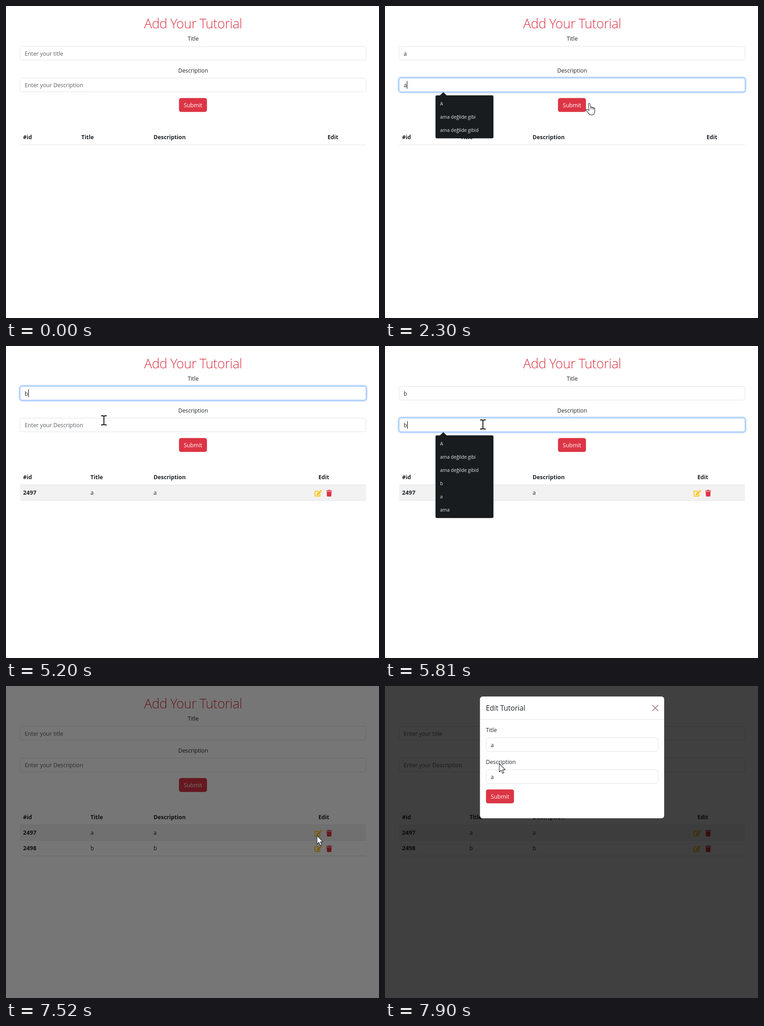
An HTML page with a canvas for the animation above (8 s loop, 819 px wide and 684 px high).

```html
<!DOCTYPE html>
<html lang="en">
<head>
<meta charset="utf-8">
<title>Tutorial form</title>
<style>
html, body { margin: 0; width: 100%; height: 100%; overflow: hidden; background: #fff; }
canvas { display: block; width: 819px; height: 684px; }
</style>
</head>
<body>
<canvas id="stage" width="819" height="684"></canvas>
<script>
const ctx = document.getElementById('stage').getContext('2d');
const LOOP = 8000, STEP = 100;
const RED = '#dc3545', DARK_RED = '#bb2d3b', INK = '#212529', HINT = '#5d6063', LINE = '#dee2e6';
const FACE = '"Open Sans", "Noto Sans", sans-serif';

const PENCIL = new Path2D('M402 82L494 174 494 186 274 406 182 416Q158 417 160 394L170 302 389 83ZM565 60L516 12Q488-10 461 12L425 47 425 61 515 151 529 151 565 116Q585 88 565 60ZM384 346V448H64V128H294L302 124 342 84Q349 70 334 64H48Q0 64 0 112V464Q0 512 48 512H400Q448 512 448 464V306Q442 288 427 298L387 338Z');
const BIN = new Path2D('M432 32H312L303 13Q296 0 281 0H167Q152 0 145 13L136 32H16Q0 32 0 48V80Q0 96 16 96H432Q448 96 448 80V48Q448 32 432 32ZM53 467Q58 512 101 512H347Q390 512 395 467L416 128H32Z');
const HAND = new Path2D('M-2.5 1.8Q-1-1 1 1.5L2.5 9Q4.5 7 6 9.5Q8 8 9 10.5Q11.5 9.5 11.5 13V19Q11 26 5 26Q0 26-2 22L-7.5 16Q-8 13-4.5 14L-.8 16Z');
const ARROW = new Path2D('M0 0V18.5L4.2 14.6 7 21.5 10 20.3 7.2 13.6H13Z');
const BEAM = new Path2D('M-6-10H-2L0-9 2-10H6M-6 10H-2L0 9 2 10H6M0-9V9');

const SUGGESTIONS = ['A', 'ama değilde gibi', 'ama değilde gibid', 'b', 'a', 'ama'];

// time, x, y, shape drawn from that time on
const PATH = [
  [100, 742, 662, 'arrow'], [400, 400, 330, 'arrow'], [600, 200, 118, 'beam'], [680, 185, 111, 'beam'],
  [1300, 185, 111, 'beam'], [1400, 186, 122, 'arrow'], [1500, 187, 147, 'arrow'], [1590, 188, 159, 'beam'],
  [1700, 189, 170, 'beam'], [2000, 189, 170, 'beam'], [2100, 270, 192, 'arrow'], [2300, 449, 213, 'hand'],
  [2400, 436, 217, 'hand'], [2900, 437, 220, 'hand'], [3100, 450, 242, 'arrow'], [3300, 473, 269, 'arrow'],
  [3400, 330, 178, 'beam'], [3500, 213, 113, 'beam'], [3700, 214, 109, 'beam'], [4000, 215, 112, 'beam'],
  [5000, 215, 112, 'beam'], [5100, 215, 135, 'arrow'], [5200, 215, 163, 'beam'], [5300, 215, 172, 'beam'],
  [5800, 215, 172, 'beam'], [5900, 340, 205, 'arrow'], [6000, 433, 219, 'hand'], [6400, 433, 219, 'hand'],
  [6600, 437, 229, 'hand'], [6700, 460, 244, 'arrow'], [7000, 630, 300, 'arrow'], [7200, 685, 324, 'hand'],
  [7400, 684, 327, 'arrow'], [7500, 683, 328, 'arrow'], [7600, 640, 312, 'arrow'], [7800, 330, 200, 'arrow'],
  [7900, 251, 170, 'arrow']
];

const clamp = v => Math.max(0, Math.min(1, v));
const within = (t, a, b) => t >= a && t < b;
const fade = (t, a, b) => t < b ? clamp((t - a) / 150 + 0.4) * (t >= a) : 0;
const blink = (t, since) => (t - since) % 1000 < 500;

function text(str, x, y, { size = 12.25, weight = 400, color = INK, align = 'left', gap = 0 } = {}) {
  ctx.font = `${weight} ${size}px ${FACE}`;
  ctx.letterSpacing = gap + 'px';
  ctx.textAlign = align;
  ctx.fillStyle = color;
  ctx.fillText(str, x, y);
}

function box(x, y, w, h, r, fill, stroke) {
  ctx.beginPath();
  ctx.roundRect(x, y, w, h, r);
  if (fill) { ctx.fillStyle = fill; ctx.fill(); }
  if (stroke) { ctx.strokeStyle = stroke; ctx.lineWidth = 1; ctx.stroke(); }
}

function rule(x, y, w) {
  ctx.fillStyle = LINE;
  ctx.fillRect(x, y, w, 1);
}

function field(x, y, w, value, hint, focus = 0, caret = false) {
  if (focus) {
    ctx.globalAlpha = focus;
    box(x - 3.2, y - 3.2, w + 6.4, 36.4, 8, '#c2dbfe');
    ctx.globalAlpha = 1;
  }
  box(x, y, w, 30, 4.5, '#fff', focus ? '#86b7fe' : LINE);
  text(value || hint, x + 10, y + 20, { color: value ? INK : HINT });
  if (caret) {
    ctx.fillStyle = '#000';
    ctx.fillRect(Math.round(x + 10 + (value ? ctx.measureText(value).width : -0.4)), y + 6.5, 1, 17);
  }
}

function button(x, y, fill) {
  box(x, y, 61.5, 30.5, 4.8, fill);
  text('Submit', x + 30.75, y + 19.8, { color: '#fff', align: 'center' });
}

function icon(shape, x, y, color) {
  ctx.save();
  ctx.translate(x, y);
  ctx.scale(0.0281, 0.0281);
  ctx.fillStyle = color;
  ctx.fill(shape, 'evenodd');
  ctx.restore();
}

function table(rows) {
  const bold = { weight: 700 };
  const titleX = rows.length ? 185.5 : 165.5;
  text('#id', 37.5, 292.3, bold);
  text('Title', titleX, 292.3, bold);
  text('Description', 324, 292.3, bold);
  text('Edit', rows.length ? 686 : 706, 292.3, bold);
  rows.forEach((name, i) => {
    const y = 304 + i * 34;
    if (i % 2 === 0) {
      ctx.fillStyle = '#f2f2f2';
      ctx.fillRect(31, y, 759.5, 34);
    }
    rule(31, y + 34, 759.5);
    text(String(2497 + i), 37.5, y + 22, { weight: 700, size: 12.8 });
    text(name, titleX, y + 22);
    text(name, 324, y + 22);
    icon(PENCIL, 677.6, y + 11.6, '#ffc107');
    icon(BIN, 703.2, y + 11.6, RED);
  });
  rule(31, 304, 759.5);
}

function popup(count) {
  ctx.save();
  ctx.shadowColor = 'rgba(0,0,0,.3)';
  ctx.shadowBlur = 3;
  box(111, 196, 127, 7 + 29 * count, 3, '#181c1f');
  ctx.restore();
  ctx.beginPath();
  ctx.moveTo(120, 196.5);
  ctx.lineTo(128, 189);
  ctx.lineTo(136, 196.5);
  ctx.fillStyle = '#181c1f';
  ctx.fill();
  SUGGESTIONS.slice(0, count).forEach((s, i) =>
    text(s, 121, 218 + 29 * i, { size: 10.25, color: '#e4e6e8' }));
}

function dialog(t) {
  const p = clamp((t - 7560) / 300);
  if (!p) return;
  const e = 1 - (1 - p) ** 2;
  ctx.save();
  ctx.globalAlpha = e;
  ctx.translate(0, -40 * (1 - e));
  box(208.5, 23, 404.5, 267, 6, '#fff');
  rule(209, 73, 404);
  text('Edit Tutorial', 221.5, 54, { size: 15.5, weight: 500 });
  ctx.strokeStyle = '#936f66';
  ctx.lineWidth = 1.5;
  ctx.stroke(new Path2D('M587 42L600 54.5M600 42L587 54.5'));
  text('Title', 221.5, 101.3);
  field(222, 113.5, 377.5, 'a');
  text('Description', 221.5, 171.3);
  field(222, 183.5, 377.5, 'a');
  button(221.7, 226.8, RED);
  ctx.restore();
}

function pointer(t) {
  if (t < PATH[0][0]) return;
  let i = PATH.length - 1;
  while (PATH[i][0] > t) i--;
  const a = PATH[i], b = PATH[i + 1] || a;
  const k = b === a ? 0 : (t - a[0]) / (b[0] - a[0]);
  ctx.save();
  ctx.translate(a[1] + (b[1] - a[1]) * k, a[2] + (b[2] - a[2]) * k);
  if (a[3] === 'beam') {
    ctx.strokeStyle = '#000';
    ctx.lineWidth = 1.8;
    ctx.stroke(BEAM);
  } else {
    const shape = a[3] === 'hand' ? HAND : ARROW;
    ctx.fillStyle = '#fff';
    ctx.strokeStyle = '#24242e';
    ctx.lineWidth = 1.1;
    ctx.lineJoin = 'round';
    ctx.fill(shape);
    ctx.stroke(shape);
    if (shape === HAND) ctx.stroke(new Path2D('M2.5 9L3 13M6 9.5V13.5M9 10.5V14'));
  }
  ctx.restore();
}

function draw(t) {
  ctx.fillStyle = '#fff';
  ctx.fillRect(0, 0, 819, 684);
  text('Add Your Tutorial', 410.8, 48.5, { size: 29, weight: 300, color: RED, align: 'center', gap: -0.5 });

  const title = within(t, 1200, 2700) ? 'a' : within(t, 5000, 6400) ? 'b' : '';
  const desc = within(t, 2000, 2700) ? 'a' : within(t, 5700, 6400) ? 'b' : '';
  const titleFocus = fade(t, 900, 1700) + fade(t, 4300, 5400);
  const descFocus = fade(t, 1700, 2500) + fade(t, 5400, 6200);
  const titleKey = t < 1200 ? 900 : t < 4300 ? 1200 : t < 5000 ? 4300 : 5000;
  const descKey = t < 2000 ? 1700 : t < 5400 ? 2000 : t < 5700 ? 5400 : 5700;

  text('Title', 411, 76.3, { align: 'center' });
  field(31, 88.5, 759.5, title, 'Enter your title', titleFocus, titleFocus && blink(t, titleKey));
  text('Description', 411, 146.3, { align: 'center' });
  field(31, 158, 759.5, desc, 'Enter your Description', descFocus, descFocus && blink(t, descKey));

  const pressed = within(t, 2500, 2700) || within(t, 6200, 6400);
  const hover = within(t, 2400, 3100) || within(t, 6000, 6700);
  if (pressed) box(376.5, 198.5, 68, 37, 8, 'rgba(225,83,97,.5)');
  button(379.8, 201.8, hover ? DARK_RED : RED);

  table(t < 2700 ? [] : t < 6400 ? ['a'] : ['a', 'b']);

  if (within(t, 1800, 2000) || within(t, 5500, 5900)) popup(6);
  else if (within(t, 2000, 2500)) popup(3);

  // one backdrop per table row
  const shade = 0.5 * clamp((t - 7404) / 150);
  ctx.fillStyle = `rgba(0,0,0,${1 - (1 - shade) ** 2})`;
  ctx.fillRect(0, 0, 819, 684);
  dialog(t);
  pointer(t);
}

const start = performance.now();
function tick(now) {
  const t = Math.max(0, now - start) % LOOP;
  draw(Math.floor(t / STEP) * STEP);
  requestAnimationFrame(tick);
}
draw(0);
requestAnimationFrame(tick);
</script>
</body>
</html>
```
